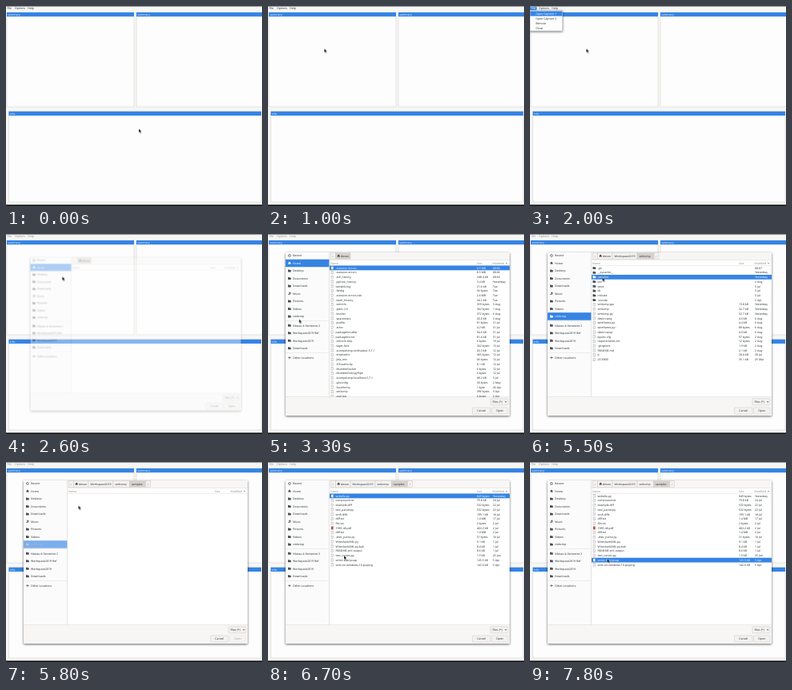
Recreate the animation shown at these times as an HTML page. Size 320 by 250 pixels, loop 8 s.

```html
<!DOCTYPE html>
<html lang="en">
<head>
<meta charset="utf-8">
<title>Opening a capture</title>
<style>
html, body { margin: 0; width: 100%; height: 100%; overflow: hidden; background: #f6f6f5; }
svg { display: block; width: 320px; height: 250px; }
text { font: 3.5px "Noto Sans", "Open Sans", sans-serif; fill: #2e3436; text-rendering: geometricPrecision; white-space: pre; }
.blue { fill: #3584e4; }
.panel { fill: #fdfdfd; stroke: #d5d2ce; stroke-width: .6; }
.lit text { fill: #fff; }
.lit .icon { fill: #fff; stroke: none; }
.soft { fill: #8b8e8f; }
.icon { fill: #4a4e50; }
.sheet { fill: #f3f3f3; stroke: #9a9a9a; stroke-width: .4; }
.button { fill: #f3f2f1; stroke: #cdc7c2; stroke-width: .5; }
.button.down { fill: #d6d1cd; }
.rule { fill: #d9d6d3; }
.lit, .anim { animation: 8s step-end infinite; }

/* 1% = 80 ms */
#menu { animation-name: menu; }
@keyframes menu { 0%, 32.5%, 100% { opacity: 0 } 18.75% { opacity: 1 } }
#first { animation-name: first; }
@keyframes first { 0% { opacity: 0 } 25%, 100% { opacity: 1 } }
#bar { animation-name: bar; }
@keyframes bar { 0% { opacity: 1 } 32.5%, 100% { opacity: .5 } }
#dialog { animation-name: dialog; transform-origin: 162px 125px; }
@keyframes dialog {
  0% { opacity: 0; transform: scale(.9) }
  32.5% { opacity: .4; transform: scale(.94) }
  33.75% { opacity: .8; transform: scale(.98) }
  35%, 100% { opacity: 1; transform: none }
}
#homePath { animation-name: homePath; }
@keyframes homePath { 0% { opacity: 1 } 45%, 100% { opacity: 0 } }
#homeRows { animation-name: homeRows; }
@keyframes homeRows { 0%, 45%, 100% { opacity: 0 } 35% { opacity: 1 } }
#repoPath { animation-name: repoPath; }
@keyframes repoPath { 0%, 71.25%, 100% { opacity: 0 } 45% { opacity: 1 } }
#repoRows { animation-name: repoRows; }
@keyframes repoRows { 0%, 71.25%, 100% { opacity: 0 } 46.25% { opacity: 1 } }
#samplePath { animation-name: samplePath; }
@keyframes samplePath { 0% { opacity: 0 } 71.25%, 100% { opacity: 1 } }
#sampleRows { animation-name: sampleRows; }
@keyframes sampleRows { 0% { opacity: 0 } 73.75%, 100% { opacity: 1 } }
#open { animation-name: open; }
@keyframes open { 0%, 73.75%, 100% { opacity: 1 } 45%, 71.25% { opacity: .4 } 46.25% { opacity: 1 } }
.homePlace { animation-name: homePlace; }
@keyframes homePlace { 0% { opacity: 1 } 43.75% { opacity: .5 } 45%, 100% { opacity: 0 } }
.repoPlace { animation-name: repoPlace; }
@keyframes repoPlace { 0%, 73.75%, 100% { opacity: 0 } 43.75% { opacity: .5 } 45% { opacity: 1 } 72.5% { opacity: .65 } }
.untilOpen { animation-name: untilOpen; }
@keyframes untilOpen { 0% { opacity: 1 } 68.75%, 100% { opacity: 0 } }
.fromOpen { animation-name: fromOpen; }
@keyframes fromOpen { 0% { opacity: 0 } 68.75%, 100% { opacity: 1 } }
.untilPick { animation-name: untilPick; }
@keyframes untilPick { 0% { opacity: 1 } 97.5%, 100% { opacity: 0 } }
.fromPick { animation-name: fromPick; }
@keyframes fromPick { 0% { opacity: 0 } 97.5%, 100% { opacity: 1 } }
#cursor { animation-name: cursor; }
@keyframes cursor {
  0% { transform: translate(166px, 153.5px) }
  2.5% { transform: translate(166px, 153.5px); animation-timing-function: steps(3, start) }
  6.25% { transform: translate(60px, 40px) }
  10% { transform: translate(60px, 40px); animation-timing-function: steps(3, start) }
  13.75% { transform: translate(70.3px, 53.3px) }
  36.25% { transform: translate(70.3px, 53.3px); animation-timing-function: steps(5, start) }
  42.5% { transform: translate(38.8px, 106.5px) }
  52.5% { transform: translate(38.8px, 106.5px); animation-timing-function: steps(4, start) }
  57.5% { transform: translate(93px, 39.8px); animation-timing-function: steps(4, start) }
  62.5% { transform: translate(91px, 53.5px) }
  63.75% { transform: translate(91px, 53.5px); animation-timing-function: steps(2, start) }
  66.25% { transform: translate(90.5px, 54.5px) }
  78.75% { transform: translate(90.5px, 54.5px); animation-timing-function: steps(5, start) }
  85% { transform: translate(95px, 117px) }
  87.5% { transform: translate(95px, 117px); animation-timing-function: steps(6, start) }
  95%, 100% { transform: translate(96.5px, 121px) }
}
</style>
</head>
<body>
<svg viewBox="0 0 320 250">
  <defs>
    <linearGradient id="edge" x2="0" y2="1"><stop stop-color="#666"/><stop offset="1" stop-color="#f6f6f5"/></linearGradient>
    <filter id="shade" x="-10%" y="-10%" width="120%" height="125%"><feDropShadow dx="0" dy="1" stdDeviation="1.7" flood-opacity=".6"/></filter>
    <clipPath id="listClip"><rect x="76" y="39" width="226" height="164.5"/></clipPath>
  </defs>

  <rect width="320" height="250" fill="#f6f6f5"/>
  <rect width="320" height="1.6" fill="url(#edge)"/>
  <g id="bar" class="anim">
    <text x="1.5" y="4.3">File</text><text x="11" y="4.3">Options</text><text x="27.3" y="4.3">Help</text>
  </g>
  <g id="panels"></g>
  <rect y="248.4" width="320" height="1.6" fill="#111"/>

  <g id="menu" class="anim">
    <rect class="blue" y="1.2" width="8.5" height="4.2"/>
    <text x="1.5" y="4.3" style="fill:#fff">File</text>
    <rect x="0" y="5.5" width="40.5" height="25.5" fill="#fdfdfd" stroke="#aaa" stroke-width=".4" filter="url(#shade)"/>
    <text x="7.2" y="10.7">Open Capture 1</text>
    <text x="7.2" y="16.9">Open Capture 2</text>
    <text x="7.2" y="23.1">Remote</text>
    <text x="7.2" y="29.2">Close</text>
    <g id="first" class="lit"><rect class="blue" x=".3" y="6.4" width="40" height="6.2"/><text x="7.2" y="10.7">Open Capture 1</text></g>
  </g>

  <g id="dialog" class="anim">
    <rect x="22" y="23" width="280" height="204" rx="1" fill="#f7f6f5" filter="url(#shade)"/>
    <rect x="22" y="23" width="54.5" height="180.5" fill="#fbfbfb"/>
    <rect x="77" y="33" width="225" height="170.5" fill="#fff"/>
    <rect class="rule" x="76.3" y="23" width=".6" height="180.5"/>
    <rect class="rule" x="22" y="203.3" width="280" height=".5"/>
    <rect class="rule" x="77" y="32.6" width="225" height=".4"/>
    <rect class="rule" x="77" y="39" width="225" height=".4"/>
    <text class="soft" x="78" y="37.6">Name</text><text class="soft" x="261" y="37.6">Size</text><text class="soft" x="280.5" y="37.6">Modified</text>
    <path class="soft" d="M297 37.2l1.1-1.6 1.1 1.6z"/>
    <g id="places"></g>
    <g id="homePath" class="anim"></g>
    <g id="repoPath" class="anim"></g>
    <g id="samplePath" class="anim"></g>
    <g clip-path="url(#listClip)">
      <g id="homeRows" class="anim"></g>
      <g id="repoRows" class="anim"></g>
      <g id="sampleRows" class="anim"></g>
    </g>
    <rect class="button" x="278" y="205.8" width="22" height="8" rx="1"/>
    <text x="280.5" y="211">Files (*)</text><path class="icon" d="M296 209.2h2.4l-1.2 1.5z"/>
    <rect class="button" x="255.5" y="217" width="22.5" height="8" rx="1"/><text x="261.3" y="222.2">Cancel</text>
    <g id="open" class="anim"><rect class="button" x="279.5" y="217" width="20.5" height="8" rx="1"/><text x="285.3" y="222.2">Open</text></g>
  </g>

  <g id="cursor" class="anim"><path d="M0 0v4.7l1.1-1 .9 2 1-.45-.9-1.9h1.5z" fill="#000" stroke="#fff" stroke-width=".35"/></g>
</svg>
<script>
const put = (id, html) => document.getElementById(id).innerHTML += html;
const label = (x, y, s) => `<text x="${x}" y="${y}">${s}</text>`;
const folder = (x, y) => `<path class="icon" d="M${x} ${y - 1.5}h1.5l.5.5h1.7v2.5h-3.7z"/>`;
const sheet = (x, y, fill) => `<rect class="sheet" x="${x + .5}" y="${y - 1.8}" width="2.7" height="3.6"${fill ? ` style="fill:${fill}"` : ''}/>`;
const house = (x, y) => `<path class="icon" d="M${x} ${y}l1.9-1.9 1.9 1.9h-.6v1.6h-.9v-1.1h-.8v1.1h-.9v-1.6z"/>`;

// Panels
const panel = (x, y, w, h, name) =>
  `<rect class="panel" x="${x}" y="${y}" width="${w}" height="${h}"/>
   <rect class="blue" x="${x}" y="${y}" width="${w}" height="5.2"/>
   <text x="${x + 1.2}" y="${y + 3.8}" style="fill:#e4effc">${name}</text>`;
put('panels', panel(1, 8, 159, 118, 'summary') + panel(163, 8, 158, 118, 'summary') + panel(3.5, 131.8, 315.5, 113.2, 'info.'));

// Sidebar
const clock = (x, y) => `<circle cx="${x + 1.9}" cy="${y}" r="1.5" fill="none" stroke="#4a4e50" stroke-width=".6"/><path class="icon" d="M${x + 1.7} ${y - 1}h.4v.9h.7v.4h-1.1z"/>`;
const plus = (x, y) => `<path class="icon" d="M${x + 1.6} ${y - 1.7}h.6v1.4h1.4v.6h-1.4v1.4h-.6v-1.4h-1.4v-.6h1.4z"/>`;
const note = (x, y) => `<path class="icon" d="M${x + 1.2} ${y - 1.7}h2.2v2.8h-1v-2h-.6v2.5h-1.4v-1h.8z"/>`;
const marks = { Recent: clock, Home: house, Music: note, 'Other Locations': plus };
const place = (name, y) => (marks[name] || folder)(25, y) + label(31, y + 1.2, name);
const litPlace = (cls, name, y) => `<g class="lit ${cls}"><rect class="blue" x="22" y="${y - 4.8}" width="54.4" height="9.5"/>${place(name, y)}</g>`;
const top9 = ['Recent', 'Home', 'Desktop', 'Documents', 'Downloads', 'Music', 'Pictures', 'Videos', 'smbcmp'];
const marked = ['Niveau-4-Semestre 2', 'Workspace2019 Ref', 'Workspace2019', 'Downloads'];
put('places',
  top9.map((n, i) => place(n, 27 + i * 9.5)).join('') +
  marked.map((n, i) => place(n, 114.3 + i * 9.5)).join('') +
  place('Other Locations', 154.6) +
  [108.5, 148.6].map(y => `<rect class="rule" x="22" y="${y}" width="54.4" height=".4"/>`).join('') +
  litPlace('homePlace', 'Home', 36.5) + litPlace('repoPlace', 'smbcmp', 103));

// Path bar: [x, width, name]
function path(id, crumbs) {
  const last = crumbs.length - 1, end = crumbs[last][0] + crumbs[last][1];
  const box = (x, w, down) => `<rect class="button${down ? ' down' : ''}" x="${x}" y="23.6" width="${w}" height="7.6"/>`;
  put(id, box(78.5, 6) + label(80.6, 28.6, '‹') + crumbs.map(([x, w, name], i) =>
    box(x, w, i === last) + (i ? '' : house(x + 1.8, 27.4)) + label(x + (i ? 2.4 : 6.6), 28.6, name)).join('') +
    (last ? box(end, 6) + label(end + 2.2, 28.6, '›') : ''));
}
const home = [84.5, 18.5, 'devon'], work = [103, 31, 'Workspace2019'];
path('homePath', [home]);
path('repoPath', [home, work, [134, 21, 'smbcmp']]);
path('samplePath', [home, work, [134, 20.5, 'smbcmp'], [154.5, 20, 'samples']]);

// File lists: name|size|date, a row without a size is a folder
function list(id, data, picks) {
  const rows = data.trim().split('\n').map(r => r.trim().split('|'));
  const row = ([name, size, date], i) => {
    const y = 42.4 + i * 5.73, red = name.endsWith('.pdf') && '#d9433c';
    return (size ? sheet(78.5, y, red) : folder(78.5, y)) +
      label(84.5, y + 1.2, name) + label(261, y + 1.2, size) + label(281, y + 1.2, date);
  };
  put(id, rows.map(row).join('') + picks.map(([i, cls]) =>
    `<g class="lit ${cls}"><rect class="blue" x="77" y="${39.5 + i * 5.73}" width="225" height="5.8"/>${row(rows[i], i)}</g>`).join(''));
}
list('homeRows', `
  .xsession-errors|8.5 MB|08:06
  .xsession-errors|8.5 MB|08:06
  .zsh_history|248.4 kB|08:04
  .python_history|3.4 kB|Yesterday
  testsblk.log|21.6 kB|Tue
  .fehbg|56 bytes|Tue
  .xsession-errors.old|2.6 MB|Tue
  .bash_history|34.2 kB|Tue
  .viminfo|359 bytes|3 Aug
  .gtkrc-2.0|362 bytes|1 Aug
  .lesshst|372 bytes|6 Aug
  .spacemacs|20.0 kB|3 Aug
  .profile|81 bytes|31 Jul
  .zshrc|4.2 kB|31 Jul
  packagelist.after|94.6 kB|31 Jul
  packagelist.txt|81.4 kB|31 Jul
  .viminfo.tmp|0 bytes|19 Jul
  .wget-hsts|262 bytes|13 Jul
  .zcompdump.ordinateur-5.7.1|43.3 kB|12 Jul
  .imwheelrc|365 bytes|12 Jul
  .jida_env|66 bytes|12 Jul
  .ICEauthority|8.1 kB|12 Jul
  .MumbleSocket|0 bytes|12 Jul
  .MumbleOverlayPipe|0 bytes|12 Jul
  .zcompdump-localhost-5.7.1|48.2 kB|3 Jul
  .gitconfig|50 bytes|2 May
  .Xauthority|1 byte|26 Apr
  .smbcmp|396 bytes|3 Apr
  .xsel.log|0 bytes|2 Apr`, [[0, '']]);
list('repoRows', `
  .git||08:07
  __pycache__||Yesterday
  samples||Yesterday
  bin||2 Aug
  tests||5 Jul
  lib||5 Jul
  include||5 Jul
  .vscode||2 Apr
  smbcmp-gui|13.8 kB|Yesterday
  smbcmp|32.7 kB|Yesterday
  smbcmp.py|32.7 kB|Yesterday
  devon.wxg|4.0 kB|6 Aug
  wireframe.py|4.4 kB|6 Aug
  wireframe.py~|88 bytes|6 Aug
  devon.wxg~|4.0 kB|6 Aug
  pysmc.cfg|97 bytes|2 Aug
  requirements.txt|12 bytes|2 Aug
  .gitignore|1.9 kB|2 Aug
  README.md|2.1 kB|2 Aug
  p|28.0 kB|30 Jul
  LICENSE|35.1 kB|25 Mar`, [[0, 'untilOpen'], [2, 'fromOpen']]);
list('sampleRows', `
  wshello.py|849 bytes|Yesterday
  compound.txt|79.8 kB|24 Jul
  example.diff|532 bytes|22 Jul
  test_parser.py|532 bytes|22 Jul
  sm8.diffs|199.1 kB|18 Jul
  diff.txt|1.4 MB|17 Jul
  file.txt|2 bytes|2 Jul
  1985-46.pdf|402.2 kB|2 Jul
  diff.txt|1.4 MB|2 Jul
  .#rec_parse.py|31 bytes|10 Jul
  WiresharkXML.py|9.1 kB|1 Jul
  WiresharkXML.py.bak|8.4 kB|1 Jul
  README.xml-output|8.6 kB|1 Jul
  test_curses.py|1.9 kB|25 Jun
  smb2-basil.pcap|125.5 kB|5 Apr
  smb-on-windows-10.pcapng|142.0 kB|5 Apr`, [[0, 'untilPick'], [14, 'fromPick']]);
</script>
</body>
</html>
```
